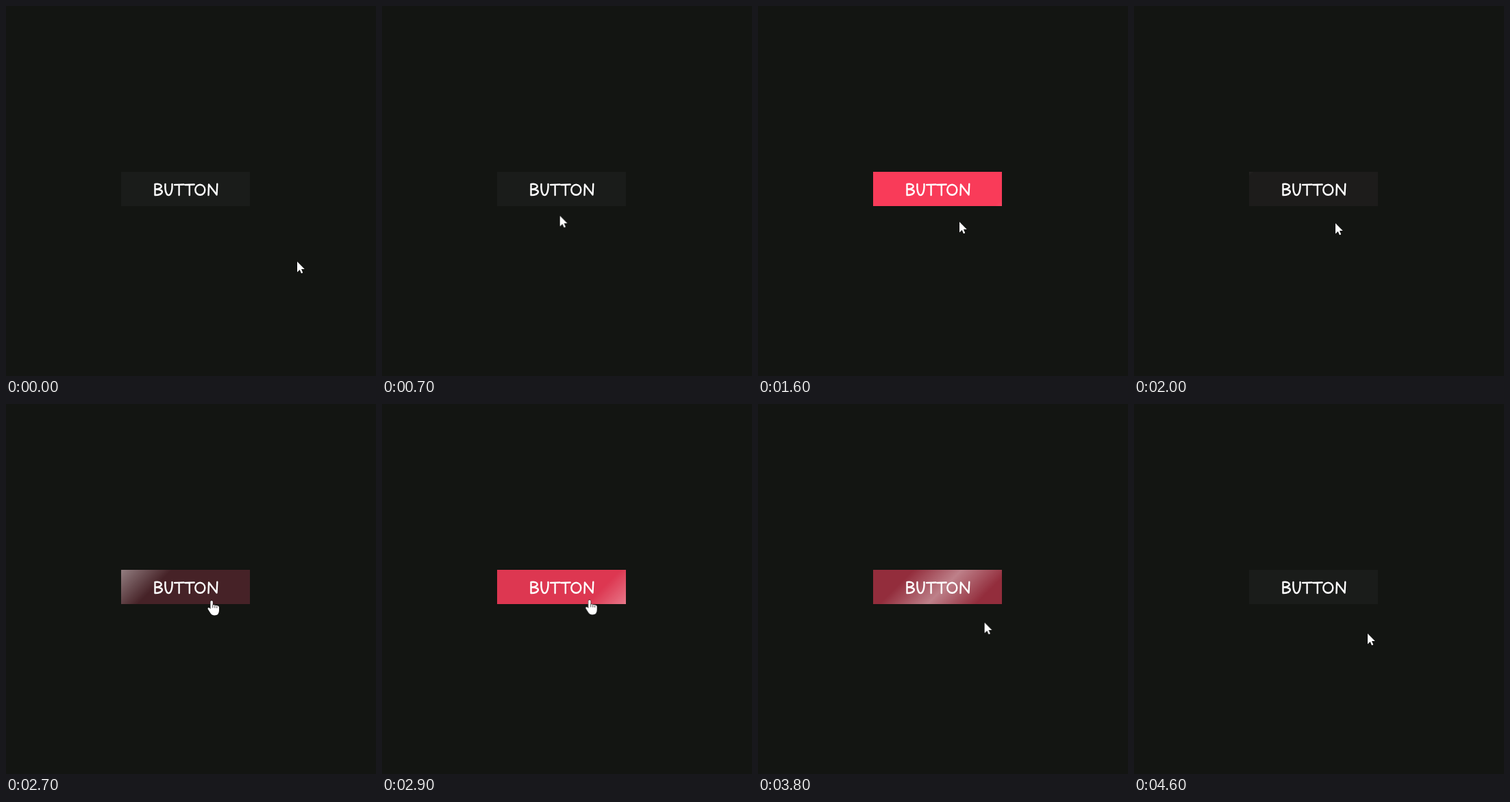
Recreate the animation shown at these times as an HTML page. Size 540 px wide and 540 px high, loop 7200 ms.

```html
<!DOCTYPE html>
<html lang="en">
<head>
<meta charset="utf-8">
<title>Shiny button</title>
<style>
  html, body { margin: 0; width: 100%; height: 100%; overflow: hidden; background: #131512; }
  #stage { position: relative; width: 540px; height: 540px; overflow: hidden; }
  #button {
    position: absolute; left: 168px; top: 242px; width: 188px; height: 50px;
    overflow: hidden; background: #1a1c1a;
    font: 24px/50px Inter, sans-serif; text-align: center; color: transparent;
  }
  #shine {
    position: absolute; inset: 0;
    background: linear-gradient(135deg, transparent 20%, rgba(255, 255, 255, .4) 50%, transparent 80%);
  }
  #lettering {
    position: absolute; inset: 0;
    fill: none; stroke: #fff; stroke-width: 2.4; stroke-linecap: round; stroke-linejoin: round;
  }
  #cursor { position: absolute; left: 0; top: 0; width: 24px; height: 28px; overflow: visible; }
  #cursor .shape { fill: #fff; stroke: #080808; stroke-linejoin: round; paint-order: stroke; }
  #cursor .crease { fill: none; stroke: #222; stroke-width: .9; }
</style>
</head>
<body>
<div id="stage">
  <div id="button">BUTTON<div id="shine"></div></div>
  <svg id="lettering" width="540" height="540" aria-hidden="true">
    <path d="M217.5 260V276M217.5 260C229 258 230 267 219 267.5C232 267.5 230 276 217.5 276"/>
    <path d="M232.5 260C231 281.5 243.5 281.5 242.5 260"/>
    <path id="tee" d="M246 261L259.5 260.5M252.6 261V276"/>
    <use href="#tee" x="15.2"/>
    <ellipse cx="283.3" cy="268.3" rx="7" ry="7.5"/>
    <path d="M295.5 276L296 260.5L307.5 275.5L308.3 259.8"/>
  </svg>
  <svg id="cursor" aria-hidden="true">
    <path id="arrow" class="shape" d="M0 0V15.5L3.7 12L6 17.2L8.3 16.3L6 11H10.8Z"/>
    <g id="hand" transform="translate(-6 -1)">
      <path class="shape" d="M4.4 2.6A1.7 1.7 0 0 1 7.8 2.6V7L14 8.2Q17 8.6 17 11V15Q17 22.5 10.5 22.5Q6 22.5 3.6 18L.6 13.2Q0 10.5 2.8 11.6L4.4 13.2Z"/>
      <path class="crease" d="M7.8 6.8V11.5M10.9 7.8V11.8M13.8 8.8V12"/>
    </g>
  </svg>
</div>
<script>
  const LOOP = 7200, TICK = 100, FADE = 500;
  const hovers = [[893, 1580], [2623, 3660]];
  const off = { backgroundColor: '#1a1c1a' }, on = { backgroundColor: '#ff3c5b' };
  const left = { transform: 'translateX(-100%)' }, right = { transform: 'translateX(100%)' };

  const pose = (time, style, easing = 'linear') => ({ ...style, offset: time / LOOP, easing });
  const tip = (time, x, y, easing) => pose(time, { transform: `translate(${x}px, ${y}px)` }, easing);

  const hoverFrames = (rest, active) => [
    pose(0, rest),
    ...hovers.flatMap(([enter, leave]) => [
      pose(enter, rest, 'ease'), pose(enter + FADE, active),
      pose(leave, active, 'ease'), pose(leave + FADE, rest)
    ]),
    pose(LOOP, rest)
  ];

  // The pointer swings in, visits the button twice and settles below it.
  const pointerFrames = [
    tip(0, 425, 373),
    tip(200, 278, 311),
    tip(300, 240, 319),
    tip(400, 240, 319, 'ease-in-out'),
    tip(1100, 292, 285),
    tip(1500, 293, 290),
    tip(1600, 294, 315, 'ease-out'),
    tip(2000, 294, 317),
    tip(2300, 294, 317, 'ease-in-out'),
    tip(2700, 300, 287, 'ease-out'),
    tip(3600, 308, 284, 'ease-out'),
    tip(4000, 341, 335),
    tip(LOOP, 341, 335)
  ];

  const play = (id, frames) => {
    const player = document.getElementById(id).animate(frames, { duration: LOOP, fill: 'both' });
    player.pause();
    return player;
  };

  const players = [
    play('button', hoverFrames(off, on)),
    play('shine', hoverFrames(left, right)),
    play('cursor', pointerFrames)
  ];
  const arrow = document.getElementById('arrow');
  const hand = document.getElementById('hand');

  function draw() {
    const time = Math.floor(performance.now() % LOOP / TICK) * TICK;
    const over = hovers.some(([enter, leave]) => time >= enter && time < leave);
    for (const player of players) player.currentTime = time;
    hand.style.display = over ? '' : 'none';
    arrow.style.display = over ? 'none' : '';
    requestAnimationFrame(draw);
  }
  draw();
</script>
</body>
</html>
```
